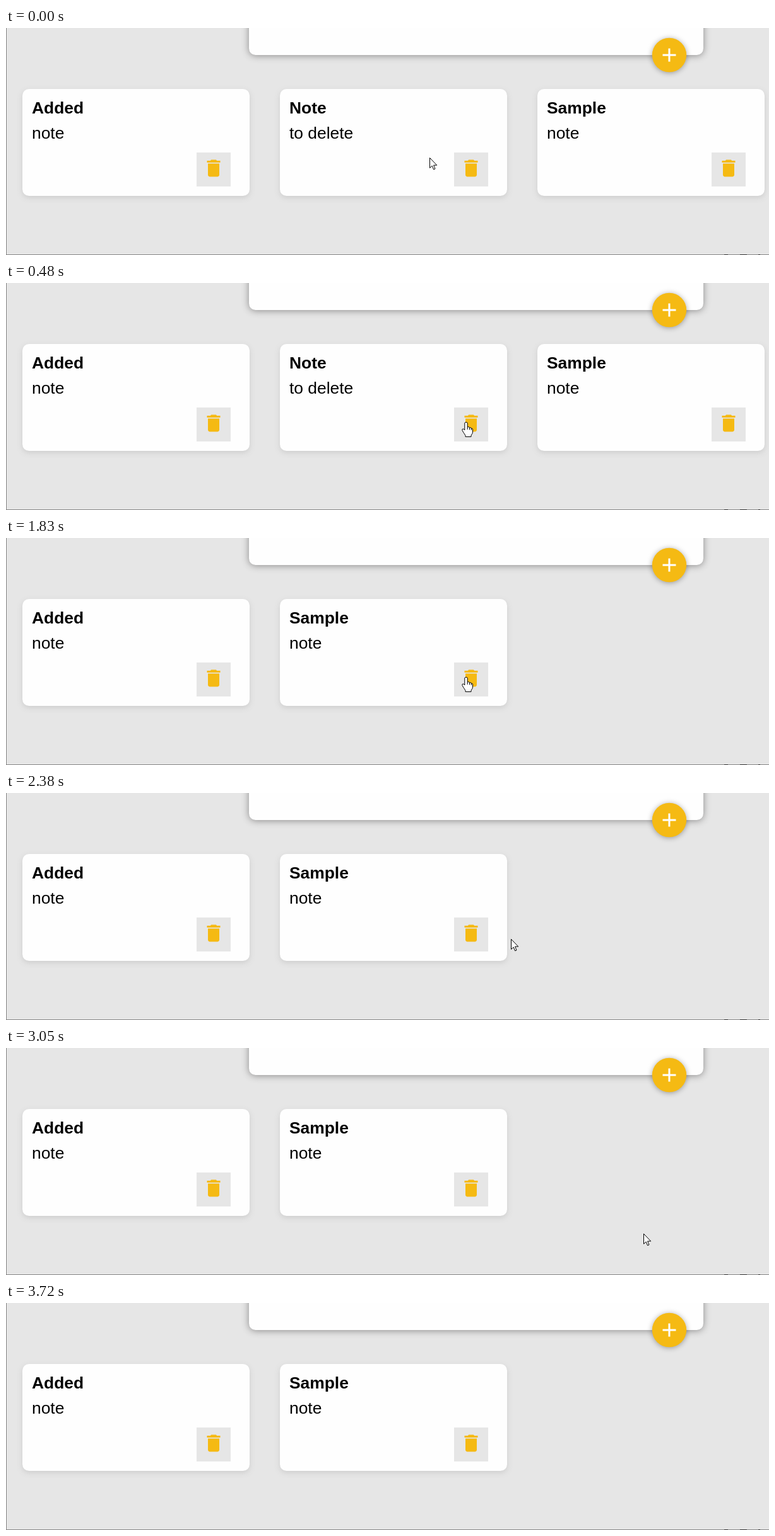
Write an HTML page that moves like this. It is 1209 px wide and 361 px high and loops after 4.28 s.

```html
<!DOCTYPE html>
<html lang="en">
<head>
<meta charset="utf-8">
<title>Deleting a note</title>
<style>
  html, body { margin: 0; width: 100%; height: 100%; overflow: hidden; background: #e6e6e6; }
  svg { display: block; width: 1209px; height: 361px; }
  text { font: 26.4px "Liberation Sans", Arial, sans-serif; fill: #000; }
  .title { font-weight: bold; }
  .panel { fill: #fefefe; }
  .note .panel { filter: drop-shadow(0 3px 4px #cdcdcd); }
  .form { filter: drop-shadow(0 1.5px 6px rgb(138, 137, 137)); }
  .add { fill: #f5ba13; filter: drop-shadow(0 1.5px 4.5px rgba(0, 0, 0, .35)); }
  .pointer path { fill: #fff; stroke: #000; stroke-width: 1; stroke-linejoin: round; }
</style>
</head>
<body>
<svg viewBox="0 0 1209 361">
  <defs>
    <path id="bin" fill="#f5ba13" d="M6 19c0 1.1.9 2 2 2h8c1.1 0 2-.9 2-2V7H6v12zM19 4h-3.5l-1-1h-5l-1 1H5v2h14V4z"/>
  </defs>
  <rect width="1209" height="361" fill="#e6e6e6"/>
  <rect class="panel form" x="385" y="-60" width="720" height="103" rx="10.5"/>
  <circle class="add" cx="1051" cy="43" r="27.2"/>
  <path d="M1040.5 43h21M1051 32.5v21" stroke="#fff" stroke-width="3"/>
  <g id="notes"></g>
  <path d="M.5 0V361M0 360.5H1209" stroke="#868686" fill="none"/>
  <path d="M1138 360.5h6M1163 360.5h11M1192 360.5h3" stroke="#333"/>
  <circle id="ring" cx="729" cy="223" r="10.5" fill="#ffffc8" fill-opacity=".2" stroke="#111"/>
  <g id="arrow" class="pointer">
    <path d="M.5 .5V16.6L4.2 13.2 6.6 19 9 18 6.6 12.2H11.7Z"/>
  </g>
  <g id="hand" class="pointer">
    <path d="M-2.2 2Q-2 .4 0 .4T2.2 2V8Q5 7 5.5 9 8 8.3 8.3 10.2 10.5 9.8 10.5 12V16Q10.3 19 8 21V23.5H-1V21.5Q-4 17 -6 13.5 -6.8 11 -4.5 11 -3 11.4 -2.2 13Z"/>
    <path d="M2.2 8V12M5.5 9V12.5M8.3 10.2V13"/>
  </g>
</svg>
<script>
const LOOP = 4280, CLICK = 1700, REMOVED = 1830;
const $ = id => document.getElementById(id);

// Pointer stops: start time, shape, x, y
const stops = [
  [0, "arrow", 671, 206],
  [120, "arrow", 682, 209],
  [240, "arrow", 700, 214],
  [360, "hand", 720, 219],
  [480, "hand", 729, 221],
  [2230, "arrow", 772, 223],
  [2380, "arrow", 800, 232],
  [2780, "arrow", 827, 239],
  [2900, "arrow", 872, 259],
  [3050, "arrow", 1010, 295],
  [3200, "arrow", 1117, 315],
  [3600, "arrow", 1136, 342],
  [3720, "none", 0, 0]
];

const note = (title, body) => `<g class="note">
  <rect class="panel" x="26" y="97" width="360" height="170" rx="10.5"/>
  <text class="title" x="41" y="136">${title}</text>
  <text x="41" y="176">${body}</text>
  <rect x="302" y="198" width="54" height="54" fill="#e6e6e6"/>
  <use href="#bin" transform="translate(311 205) scale(1.5)"/>
</g>`;

$("notes").innerHTML =
  note("Added", "note") + note("Note", "to delete") + note("Sample", "note");
const [added, doomed, sample] = $("notes").children;

const show = (el, on) => el.setAttribute("visibility", on ? "visible" : "hidden");
const place = (el, x, y) => el.setAttribute("transform", `translate(${x} ${y})`);
const slot = (el, i) => place(el, 408 * i, 0);

function draw(t) {
  const removed = t >= REMOVED;
  slot(added, 0);
  slot(doomed, 1);
  slot(sample, removed ? 1 : 2);
  show(doomed, !removed);
  show($("ring"), t >= CLICK && !removed);

  const [, shape, x, y] = stops.filter(s => s[0] <= t).pop();
  for (const id of ["arrow", "hand"]) {
    show($(id), id === shape);
    place($(id), x, y);
  }
}

const start = performance.now();
function tick() {
  draw((performance.now() - start) % LOOP);
  requestAnimationFrame(tick);
}
tick();
</script>
</body>
</html>
```
